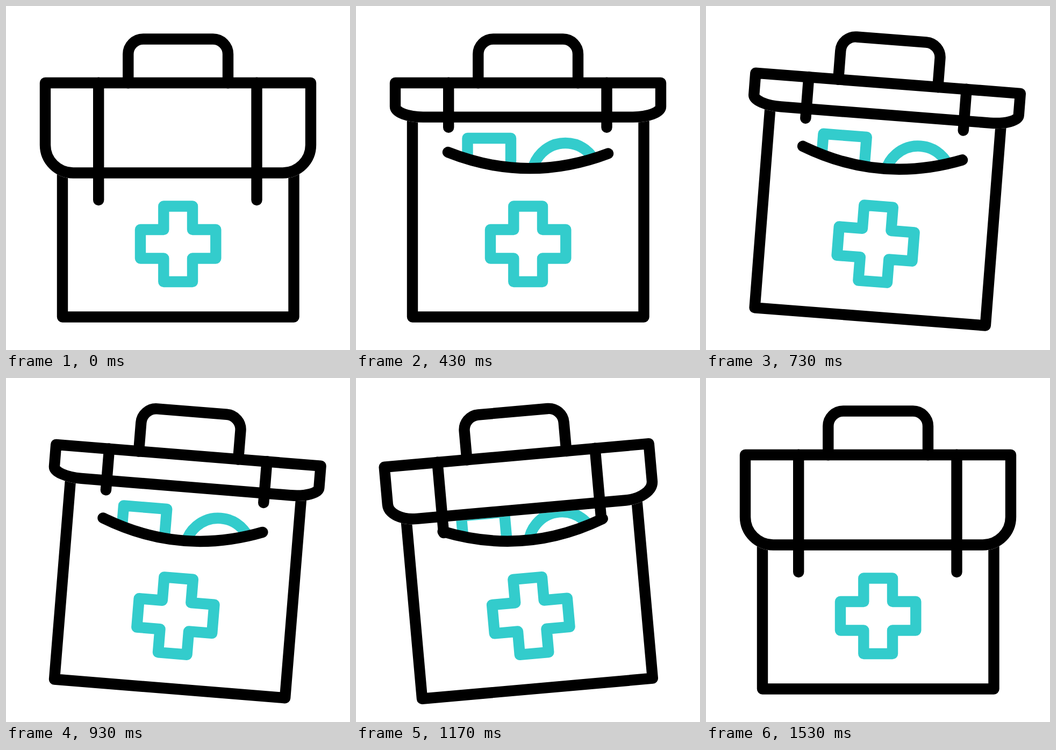
Write an HTML page that moves like this. It is 640 px wide and 640 px high and loops after 1.67 s.

```html
<!DOCTYPE html>
<html lang="en">
<head>
<meta charset="utf-8">
<title>First aid bag</title>
<style>
  html, body { margin: 0; width: 100%; height: 100%; overflow: hidden; background: #fff; }
  svg { display: block; width: 100vw; height: 100vh; }
  .line { fill: none; stroke: #000; stroke-width: 20.4; stroke-linecap: round; stroke-linejoin: round; }
  .teal { stroke: #33cccc; }
  .mask { fill: #fff; stroke: #fff; }
</style>
</head>
<body>
<svg viewBox="0 0 640 640">
  <defs>
    <clipPath id="above"><path d="M171 272Q320 331 469 274.5V140H171Z"/></clipPath>
  </defs>
  <g id="bag">
    <path class="line" d="M105 170V578.5H535.5V170"/>
    <g clip-path="url(#above)">
      <path class="line teal" d="M207.5 340V246H288V340"/>
      <circle class="line teal" cx="389.5" cy="317" r="62"/>
    </g>
    <path class="line" d="M171 272Q320 331 469 274.5"/>
    <path class="line teal" d="M293.3 372.5H347V416H390.3V469.5H347V513H293.3V469.5H250V416H293.3Z"/>
    <path id="cover" class="line mask"/>
    <path class="line" d="M227.3 143.3V89.5A28 28 0 0 1 255.3 61.5H385A28 28 0 0 1 413 89.5V143.3"/>
    <path id="flap" class="line"/>
    <path id="straps" class="line"/>
  </g>
</svg>
<script>
  const el = id => document.getElementById(id);
  const bag = el('bag'), cover = el('cover'), flap = el('flap'), straps = el('straps');
  const LOOP = 1670, STEP = 100 / 3, TOP = 143;

  // [step, value] keys, eased between neighbours
  const lift = [[0, 1], [15, 0.352], [29, 0.352], [43, 1]];
  const tilt = [[17, 0], [26, 7.55], [33, -8], [39, 3.72], [46, 0]];

  const ease = u => (1 - Math.cos(Math.PI * u)) / 2;

  function valueAt(keys, n) {
    if (n <= keys[0][0]) return keys[0][1];
    for (let i = 1; i < keys.length; i++) {
      const [a, from] = keys[i - 1], [b, to] = keys[i];
      if (n <= b) return from + (to - from) * ease((n - a) / (b - a));
    }
    return keys[keys.length - 1][1];
  }

  function draw(ms) {
    // the motion runs at 30 steps per second
    const n = Math.floor((ms % LOOP + 3.4) / STEP);
    const k = valueAt(lift, n);
    const y = d => TOP + d * k;
    const shape = `M73 ${TOP}H567V${y(115.5)}A52 ${52 * k} 0 0 1 515 ${y(167.5)}` +
      `H125A52 ${52 * k} 0 0 1 73 ${y(115.5)}Z`;
    cover.setAttribute('d', shape);
    flap.setAttribute('d', shape);
    straps.setAttribute('d', `M172.2 142.7V${y(218)}M466.5 142.7V${y(218)}`);
    bag.setAttribute('transform', `rotate(${valueAt(tilt, n)} 320 384)`);
  }

  const start = performance.now();
  function tick() {
    draw(performance.now() - start);
    requestAnimationFrame(tick);
  }
  tick();
</script>
</body>
</html>
```
